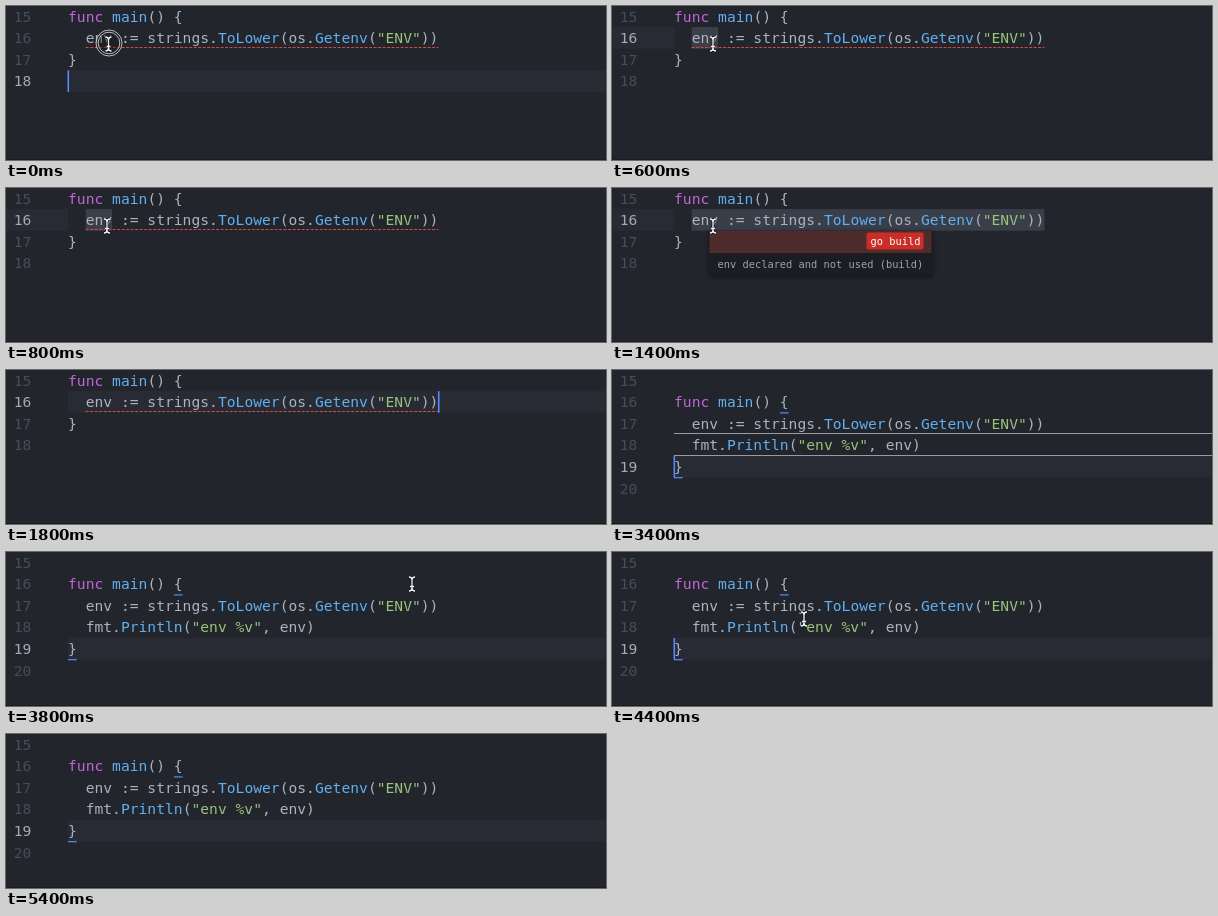
Recreate the animation shown at these times as an HTML page with a canvas. Size 600 by 154 pixels, loop 5.6 s.

```html
<!DOCTYPE html>
<html lang="en">
<head>
<meta charset="utf-8">
<style>
html, body { margin: 0; width: 100%; height: 100%; overflow: hidden; background: #22252c; }
canvas { display: block; }
</style>
</head>
<body>
<canvas id="stage" width="600" height="154"></canvas>
<script>
const c = document.getElementById('stage').getContext('2d');
const FONT = '"DejaVu Sans Mono", "Liberation Mono", monospace';
const LEFT = 62, CHAR = 8.82, ROW = 21.6, STEP = 200, LOOP = 5600;
const GREY = '#abb2bf', PURPLE = '#c066d6', BLUE = '#61afef', GREEN = '#98c379', CARET = '#528bff';

// Each token: text, colour
const MAIN = [['func ', PURPLE], ['main', BLUE], ['() {', GREY]];
const ENV = [['  env := strings.', GREY], ['ToLower', BLUE], ['(os.', GREY], ['Getenv', BLUE],
  ['(', GREY], ['"ENV"', GREEN], ['))', GREY]];
const PRINT = [['  fmt.', GREY], ['Println', BLUE], ['(', GREY], ['"env %v"', GREEN], [', env)', GREY]];
const END = [['}', GREY]];

// Pointer path after the edit: time, x, y
const PATH = [[3800, 406, 32], [4000, 370, 38], [4400, 192, 67], [4600, 196, 66], [5000, 400, 34], [5400, 400, 34]];

const rowTop = k => k * ROW - 0.5;
const col = n => LEFT + n * CHAR;

function rect(x, y, w, h, color) {
  c.fillStyle = color;
  c.fillRect(x, y, w, h);
}

function write(text, x, y, color, size = 14.65) {
  c.font = `${size}px ${FONT}`;
  c.fillStyle = color;
  c.fillText(text, x, y);
}

function codeLine(tokens, k, limit = 99) {
  let n = 0;
  for (const [text, color] of tokens) {
    write(text.slice(0, Math.max(0, limit - n)), col(n), rowTop(k) + 16.1, color);
    n += text.length;
  }
}

function dashes(x1, x2, y) {
  c.setLineDash([3, 1.5]);
  c.strokeStyle = '#d0493f';
  c.lineWidth = 1;
  c.beginPath();
  c.moveTo(x1, y);
  c.lineTo(x2, y);
  c.stroke();
  c.setLineDash([]);
}

function bracketMark(n, k) {
  rect(col(n), rowTop(k + 1) - 0.4, CHAR, 1.2, CARET);
}

function caret(n, k) {
  rect(col(n) - 0.5, rowTop(k), 1.6, ROW, CARET);
}

function pointer(x, y) {
  for (const [width, color] of [[3, '#15171b'], [1.3, '#f4f4f4']]) {
    c.lineWidth = width;
    c.strokeStyle = color;
    c.beginPath();
    c.moveTo(x - 3, y - 7);
    c.quadraticCurveTo(x, y - 7, x, y - 4);
    c.quadraticCurveTo(x, y - 7, x + 3, y - 7);
    c.moveTo(x, y - 5);
    c.lineTo(x, y + 5);
    c.moveTo(x - 3, y + 7);
    c.quadraticCurveTo(x, y + 7, x, y + 4);
    c.quadraticCurveTo(x, y + 7, x + 3, y + 7);
    c.moveTo(x - 2, y + 2.5);
    c.lineTo(x + 2, y + 2.5);
    c.stroke();
  }
}

function clickRings(x, y) {
  c.fillStyle = 'rgba(20,22,27,.35)';
  c.beginPath();
  c.arc(x, y, 13, 0, 7);
  c.fill();
  c.strokeStyle = '#c9ccd1';
  c.lineWidth = 0.9;
  for (const r of [10.8, 13]) {
    c.beginPath();
    c.arc(x, y, r, 0, 7);
    c.stroke();
  }
}

function tooltip() {
  c.save();
  c.shadowColor = 'rgba(0,0,0,.5)';
  c.shadowBlur = 5;
  c.shadowOffsetY = 1;
  rect(96.5, 43, 224, 44.5, '#1b1d23');
  c.restore();
  rect(97.5, 43, 222, 22, '#4d2c2b');
  c.fillStyle = '#cb2e26';
  c.beginPath();
  c.roundRect(254.5, 44.5, 57, 17, 2);
  c.fill();
  write('go build', 258.5, 56.7, '#fff', 10.37);
  write('env declared and not used (build)', 105.5, 79.7, '#9da3ae', 10.37);
}

function pathAt(t) {
  const i = PATH.findIndex(p => p[0] > t);
  if (i < 1) return null;
  const [a, b] = [PATH[i - 1], PATH[i]];
  const f = (t - a[0]) / (b[0] - a[0]);
  return [a[1] + (b[1] - a[1]) * f, a[2] + (b[2] - a[2]) * f];
}

function draw(t) {
  const shift = t >= 3000 ? 1 : 0;
  const inserted = t >= 2000;
  const tip = t >= 1200 && t < 1800;
  const active = t < 200 ? 3 : t < 2000 ? 1 : t < 3000 ? 2 : t < 3200 ? 3 : 4;
  const atEnd = t >= 3200;
  const selected = t >= 200 && t < 1800;
  const linted = t >= 2600 && t < 3000;

  rect(0, 0, 600, 154, '#22252c');
  rect(0, 153, 600, 1, '#1a1c21');
  if (selected) rect(0, rowTop(active), LEFT, ROW, '#282b33');
  else rect(LEFT, rowTop(active), 600 - LEFT, ROW, '#282b33');

  if (tip) rect(col(2), rowTop(1), 40 * CHAR, ROW, '#393e49');
  else if (selected || linted) rect(col(2), rowTop(1), 3 * CHAR, ROW, '#3b3f4a');

  const last = 3 + inserted + shift;
  for (let k = 0; k <= last; k++) {
    write(String(15 + k), 7.8, rowTop(k) + 16.1, k === active ? '#a4a9b3' : '#474c57');
  }

  const typed = t < 2200 ? 2 : t < 2400 ? 10 : t < 2600 ? 20 : 99;
  codeLine(MAIN, shift);
  codeLine(ENV, 1 + shift);
  if (inserted) codeLine(PRINT, 2 + shift, typed);
  codeLine(END, 2 + inserted + shift);

  if (t < 2400 && !tip) dashes(col(2), col(42), 41.5);
  if (linted) {
    dashes(LEFT, col(28), 63.5);
    bracketMark(13, 2);
    bracketMark(27, 2);
  }

  if (t >= 3200 && t < 3600) {
    rect(LEFT, 63, 538, 1, '#989ba1');
    rect(LEFT, 85, 538, 1, '#989ba1');
  }
  if (atEnd) {
    bracketMark(12, 1);
    bracketMark(0, 4);
  }

  const blink = t % 800 >= 200 && t % 800 < 600;
  if (t < 200) caret(0, 3);
  else if (t >= 1800 && t < 2000) caret(42, 1);
  else if (t >= 2000 && t < 2600) caret(typed, 2);
  else if (atEnd && blink) caret(0, 4);

  if (tip) tooltip();
  if (t < 400) clickRings(103, 37);
  if (t < 1800) pointer(t < 200 ? 102.5 : 101, 38);
  const at = pathAt(t);
  if (at) pointer(...at);
}

function tick(now) {
  draw(Math.floor((now % LOOP) / STEP) * STEP);
  requestAnimationFrame(tick);
}
draw(0);
requestAnimationFrame(tick);
</script>
</body>
</html>
```
